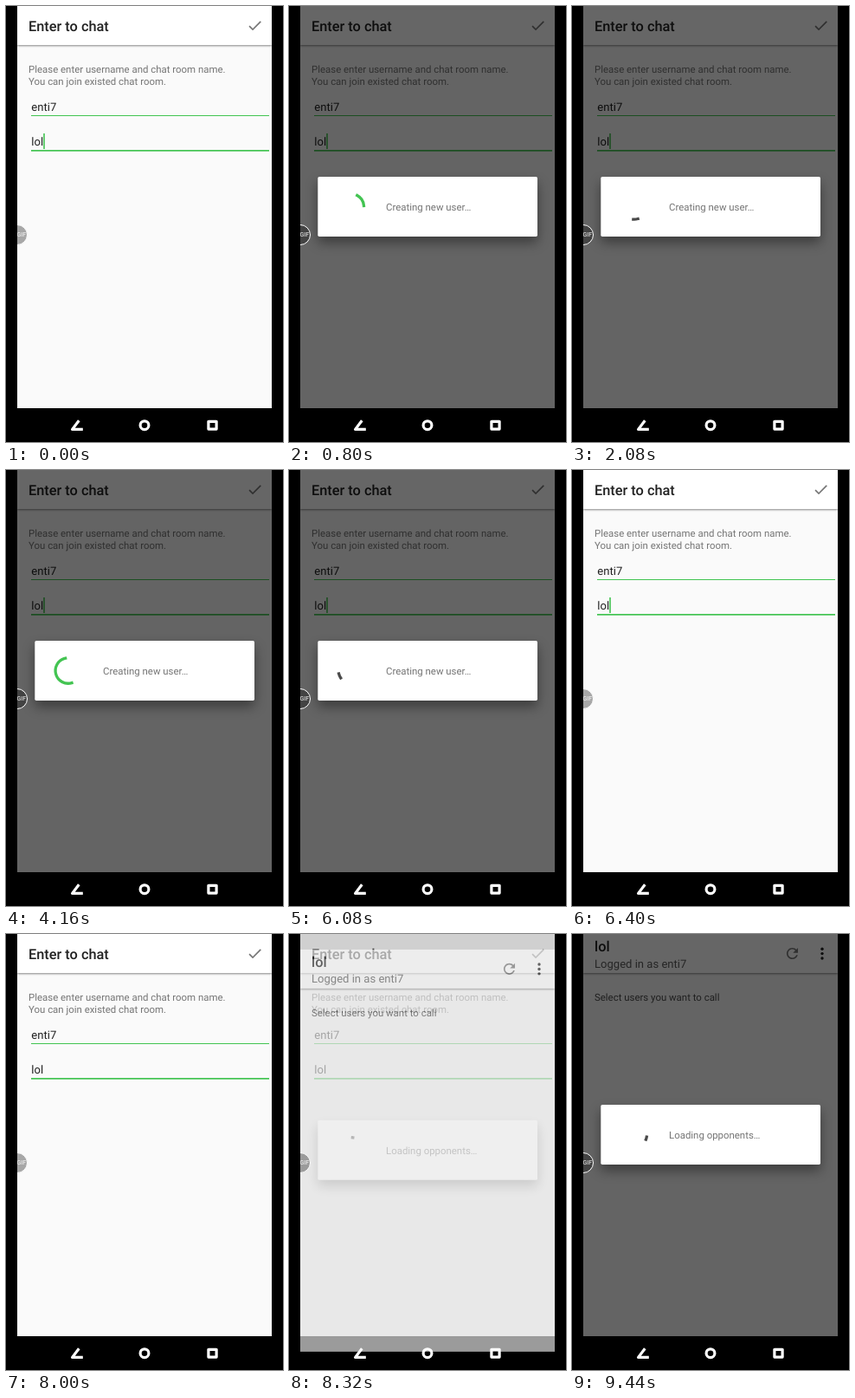
An HTML page for the animation above (9.6 s loop, 320x503 px).

```html
<!DOCTYPE html>
<html lang="en">
<head>
<meta charset="utf-8">
<title>Chat login</title>
<style>
  html, body { margin: 0; height: 100%; overflow: hidden; background: #000; }
  svg { display: block; width: 100%; height: 100%; }
  text { font: 11.43px Roboto, sans-serif; fill: #757575; text-rendering: geometricPrecision; }
  .title { font-size: 16.33px; font-weight: 500; fill: #212121; }
  .field { font-size: 13.07px; fill: #212121; }
  .subtitle { font-size: 13.07px; fill: #5c5c5c; }
  .dark { fill: #4c4c4c; }
  .icon { fill: #757575; }
  .green { fill: #43c452; }
  .shadow { filter: drop-shadow(0 1px 1.3px #0007); }
  .popup { filter: drop-shadow(0 7px 7px #0006); }
</style>
</head>
<body>
<svg viewBox="0 0 320 503">
  <rect width="320" height="503"/>
  <g fill="none" stroke="#fff" stroke-width="3.2" stroke-linejoin="round">
    <path d="M84.3 478.3L76.6 488.4H88.8"/>
    <circle cx="160" cy="483.7" r="4.9"/>
    <rect x="233.9" y="479.3" width="9.2" height="8.8"/>
  </g>

  <g id="login">
    <rect x="13" width="294" height="464" fill="#fafafa"/>
    <rect class="shadow" x="13" width="294" height="45" fill="#fff"/>
    <text class="title" x="26" y="28.5">Enter to chat</text>
    <path class="icon" transform="translate(277.7 12.7) scale(.8167)"
      d="M9 16.17L4.83 12l-1.42 1.41L9 19 21 7l-1.41-1.41z"/>
    <text x="26" y="77.4">Please enter username and chat room name.</text>
    <text x="26" y="90.8">You can join existed chat room.</text>
    <text class="field" x="29.3" y="121">enti7</text>
    <rect class="green" x="29" y="126" width="275" height="1"/>
    <text class="field" x="29.3" y="161">lol</text>
    <rect class="green" x="29" y="166" width="275" height="1.7"/>
    <rect class="green" id="cursor" x="43.2" y="147" width="1.6" height="18"/>
  </g>
  <rect id="under" x="13" width="294" height="464"/>

  <g id="room">
    <rect x="13" width="294" height="464" fill="#fafafa"/>
    <rect class="shadow" x="13" width="294" height="45" fill="#fff"/>
    <text class="title" x="26" y="20">lol</text>
    <text class="subtitle" x="26" y="38.6">Logged in as enti7</text>
    <path class="icon" transform="translate(244.7 12.7) scale(.8167)"
      d="M17.65 6.35C16.2 4.9 14.21 4 12 4c-4.42 0-7.99 3.58-7.99 8s3.57 8 7.99 8c3.73 0 6.84-2.55 7.73-6h-2.08c-.82 2.33-3.04 4-5.65 4-3.31 0-6-2.69-6-6s2.69-6 6-6c1.66 0 3.14.69 4.22 1.78L13 11h7V4l-2.35 2.35z"/>
    <g fill="#212121">
      <circle cx="289" cy="17.2" r="1.7"/>
      <circle cx="289" cy="22.6" r="1.7"/>
      <circle cx="289" cy="28" r="1.7"/>
    </g>
    <text class="dark" x="26" y="77.4">Select users you want to call</text>
  </g>
  <rect id="dim" x="13" width="294" height="464"/>

  <g id="dialog">
    <rect class="popup" x="33.3" y="197" width="253.7" height="69" rx="1.7" fill="#fff"/>
    <circle id="ring" cx="71.8" cy="231.5" r="14.7" pathLength="1" fill="none"
      stroke-width="3.3" stroke-linecap="square"/>
    <text id="message" x="112" y="235.8"></text>
  </g>

  <circle cx="13" cy="264" r="11.5" fill="#000" fill-opacity=".33" stroke="#fff"/>
  <text x="23" y="266.4" text-anchor="end" style="font-size:7px;fill:#fff">GIF</text>
  <rect width="13" height="503"/>
</svg>
<script>
const LOOP = 9600, STEP = 160, CYCLE = 1333;
const CREATE = 640, CLOSE = 6120, ENTER = 8265;
const el = id => document.getElementById(id);
const clamp = x => Math.min(1, Math.max(0, x));
const set = (id, attrs) => {
  for (const name in attrs) el(id).setAttribute(name, attrs[name]);
};

// Bezier easing from (a, 0) to (d, 1) with flat ends
function ease(p, a, b, c, d) {
  if (p <= a) return 0;
  if (p >= d) return 1;
  let lo = 0, hi = 1, u;
  for (let i = 0; i < 24; i++) {
    u = (lo + hi) / 2;
    const v = 1 - u;
    const x = a * v ** 3 + 3 * b * v * v * u + 3 * c * v * u * u + d * u ** 3;
    if (x < p) lo = u; else hi = u;
  }
  return u * u * (3 - 2 * u);
}

function spin(time) {
  const turns = Math.max(0, time) / CYCLE, p = turns % 1;
  const start = .75 * ease(p, .5, .7, .6, 1);
  const span = Math.max(.004, .75 * ease(p, 0, .2, .1, .5) - start);
  const angle = 360 * (start + .25 * p + .4 * turns) - 90;
  set('ring', {
    'stroke-dasharray': `${span} 2`,
    transform: `rotate(${angle} 71.8 231.5)`,
    stroke: span < .08 ? '#4a4a4a' : '#43c452'
  });
}

function draw(now) {
  let t = Math.floor(now % LOOP / STEP) * STEP;
  if (t > 2400 && t < 2880) t = 2400;

  const inRoom = t >= ENTER;
  const alpha = inRoom ? 1 - (1 - clamp((t - ENTER) / 200)) ** 3 : 0;
  const shift = inRoom ? 42 * (1 - clamp((t - ENTER) / 350)) ** 5 : 0;
  const fade = inRoom ? clamp((t - ENTER) / 180)
    : clamp((t - CREATE + 45) / 180) * (1 - clamp((t - CLOSE) / 220));
  const entering = inRoom && alpha < 1;
  const slide = `translate(0 ${shift})`;

  const hidden = t >= 160 && t < 640 || t >= 6720 && t < 7200 || t >= 8000;
  set('cursor', { opacity: hidden ? 0 : 1 });
  set('under', { opacity: entering ? .6 * fade : 0 });
  set('room', { opacity: alpha, transform: slide });
  set('dim', { opacity: entering ? 0 : .6 * fade });
  set('dialog', { opacity: fade, transform: slide });
  el('message').textContent = inRoom ? 'Loading opponents…' : 'Creating new user…';
  spin(t - (inRoom ? ENTER + 20 : CREATE));
}

const begin = performance.now();
(function tick() {
  draw(performance.now() - begin);
  requestAnimationFrame(tick);
})();
</script>
</body>
</html>
```
